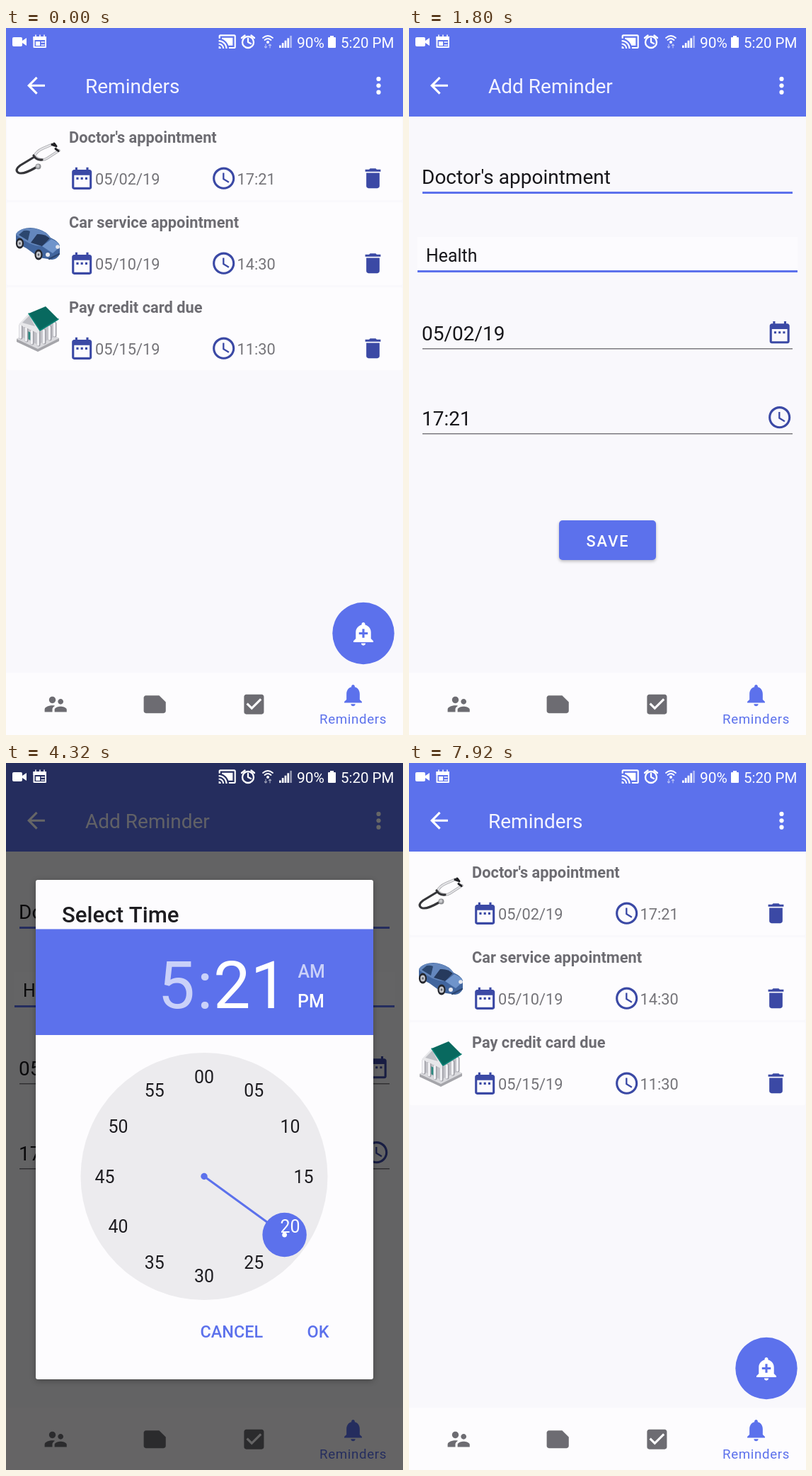
An HTML page with a canvas for the animation above (8000 ms loop, 561 by 998 pixels).

```html
<!DOCTYPE html>
<html lang="en">
<head>
<meta charset="utf-8">
<title>Reminders</title>
<style>
html, body { margin: 0; width: 100%; height: 100%; overflow: hidden; background: #f9f8fc; }
canvas { display: block; width: 561px; height: 998px; }
</style>
</head>
<body>
<canvas id="stage" width="561" height="998"></canvas>
<script>
const W = 561, H = 998, LOOP = 8000, DP = 1.558;
const BLUE = '#5c71ec', INDIGO = '#3b49a5', BG = '#f9f8fc', CARD = '#fdfcfe', GREY = '#6d6c72', INK = '#1d1c20';
const screen = document.getElementById('stage').getContext('2d');
const layerCanvas = Object.assign(document.createElement('canvas'), { width: W, height: H });
const layer = layerCanvas.getContext('2d');
let ctx = screen;

const ICONS = {
  back: 'M20 11H7.83l5.59-5.59L12 4l-8 8 8 8 1.41-1.41L7.83 13H20v-2z',
  calendar: 'M9 11H7v2h2v-2zm4 0h-2v2h2v-2zm4 0h-2v2h2v-2zm2-7h-1V2h-2v2H8V2H6v2H5c-1.11 0-1.99.9-1.99 2L3 20c0 1.1.89 2 2 2h14c1.1 0 2-.9 2-2V6c0-1.1-.9-2-2-2zm0 16H5V9h14v11z',
  clock: 'M11.99 2C6.47 2 2 6.48 2 12s4.47 10 9.99 10C17.52 22 22 17.52 22 12S17.52 2 11.99 2zM12 20c-4.42 0-8-3.58-8-8s3.58-8 8-8 8 3.58 8 8-3.58 8-8 8zm.5-13H11v6l5.25 3.15.75-1.23-4.5-2.67z',
  trash: 'M6 19c0 1.1.9 2 2 2h8c1.1 0 2-.9 2-2V7H6v12zM19 4h-3.5l-1-1h-5l-1 1H5v2h14V4z',
  bell: 'M12 22c1.1 0 2-.9 2-2h-4c0 1.1.89 2 2 2zm6-6v-5c0-3.07-1.64-5.64-4.5-6.32V4c0-.83-.67-1.5-1.5-1.5s-1.5.67-1.5 1.5v.68C7.63 5.36 6 7.92 6 11v5l-2 2v1h16v-1l-2-2z',
  addBell: 'M10.01 21.01c0 1.1.89 1.99 1.99 1.99s1.99-.89 1.99-1.99h-3.98zm8.87-4.19V11c0-3.25-2.25-5.97-5.29-6.69v-.72C13.59 2.71 12.88 2 12 2s-1.59.71-1.59 1.59v.72C7.37 5.03 5.12 7.75 5.12 11v5.82L3 18.94V20h18v-1.06l-2.12-2.12zM16 13.01h-3v3h-2v-3H8V11h3V8h2v3h3v2.01z',
  people: 'M16.5 12c1.38 0 2.49-1.12 2.49-2.5S17.88 7 16.5 7C15.12 7 14 8.12 14 9.5s1.12 2.5 2.5 2.5zM9 11c1.66 0 2.99-1.34 2.99-3S10.66 5 9 5C7.34 5 6 6.34 6 8s1.34 3 3 3zm7.5 3c-1.83 0-5.5.92-5.5 2.75V19h11v-2.25c0-1.83-3.67-2.75-5.5-2.75zM9 13c-2.33 0-7 1.17-7 3.5V19h7v-2.25c0-.85.33-2.34 2.37-3.47C10.5 13.1 9.66 13 9 13z',
  note: 'M22 10l-6-6H4c-1.1 0-2 .9-2 2v12c0 1.1.9 2 2 2h16c1.1 0 2-.9 2-2z',
  check: 'M19 3H5c-1.11 0-2 .9-2 2v14c0 1.1.89 2 2 2h14c1.11 0 2-.9 2-2V5c0-1.1-.89-2-2-2zm-9 14l-5-5 1.41-1.41L10 14.17l7.59-7.59L19 8l-9 9z',
  left: 'M15.41 7.41L14 6l-6 6 6 6 1.41-1.41L10.83 12z',
  right: 'M10 6L8.59 7.41 13.17 12l-4.58 4.59L10 18l6-6z',
  cast: 'M21 3H3c-1.1 0-2 .9-2 2v3h2V5h18v14h-7v2h7c1.1 0 2-.9 2-2V5c0-1.1-.9-2-2-2zM1 18v3h3c0-1.66-1.34-3-3-3zm0-4v2c2.76 0 5 2.24 5 5h2c0-3.87-3.13-7-7-7zm0-4v2c4.97 0 9 4.03 9 9h2c0-6.08-4.93-11-11-11zM19 7H5v1.63c3.96 1.28 7.09 4.41 8.37 8.37H19z'
};
for (const name in ICONS) ICONS[name] = new Path2D(ICONS[name]);

function icon(name, x, y, color, scale = DP) {
  ctx.save();
  ctx.translate(x, y);
  ctx.scale(scale, scale);
  ctx.fillStyle = color;
  ctx.fill(ICONS[name], 'evenodd');
  ctx.restore();
}
function text(str, x, y, size, color, { weight = 400, align = 'left', spacing = 0 } = {}) {
  ctx.font = `${weight} ${size}px Roboto, sans-serif`;
  ctx.textAlign = align;
  ctx.letterSpacing = spacing + 'px';
  ctx.fillStyle = color;
  ctx.fillText(str, x, y);
}
function rect(x, y, w, h, color, radius = 0) {
  ctx.fillStyle = color;
  ctx.beginPath();
  ctx.roundRect(x, y, w, h, radius);
  ctx.fill();
}
function disc(x, y, r, color) {
  ctx.fillStyle = color;
  ctx.beginPath();
  ctx.arc(x, y, r, 0, 7);
  ctx.fill();
}
function shape(d, color) {
  ctx.fillStyle = color;
  ctx.fill(new Path2D(d));
}
function line(d, color, width) {
  ctx.strokeStyle = color;
  ctx.lineWidth = width;
  ctx.lineCap = ctx.lineJoin = 'round';
  ctx.stroke(new Path2D(d));
}
function withAlpha(a, draw) {
  if (a <= 0) return;
  ctx.save();
  ctx.globalAlpha *= a;
  draw();
  ctx.restore();
}
function shadow(blur, y, alpha, draw) {
  ctx.save();
  ctx.shadowColor = `rgba(0,0,0,${alpha})`;
  ctx.shadowBlur = blur;
  ctx.shadowOffsetY = y;
  draw();
  ctx.restore();
}
// Piecewise linear value from [time, value] keys.
function ramp(t, ...keys) {
  if (t <= keys[0][0]) return keys[0][1];
  for (let i = 1; i < keys.length; i++) {
    const [t0, v0] = keys[i - 1], [t1, v1] = keys[i];
    if (t < t1) return v0 + (v1 - v0) * (t - t0) / (t1 - t0);
  }
  return keys[keys.length - 1][1];
}

function statusIcons() {
  const white = '#fff';
  rect(9, 13, 14, 13, white, 2);
  shape('M23 18L29 14V25L23 21Z', white);
  line('M39.5 13V27H56V13', white, 2);
  rect(38.5, 12, 18.5, 5, white);
  rect(42, 19, 6, 6, white);
  line('M50 20H54M50 24H54M42 10V12M48 10V12M54 10V12', white, 1.5);
  icon('cast', 299.5, 6, white, 1.1);
  line('M350 20a8 8 0 1 1-16 0a8 8 0 1 1 16 0M342 15V20L346 22', white, 2.3);
  line('M333 14L337.5 10.5M351 14L346.5 10.5', white, 2.3);
  line('M363 14Q370 8 377 14M365.5 17Q370 13 374.5 17', white, 1.8);
  disc(370, 20, 2, white);
  withAlpha(.55, () => line('M367 23V28M365.5 26.5L367 28L368.5 26.5M373 28V23M371.500 24.500L373 23L374.500 24.500', white, 1.2));
  for (let i = 0; i < 5; i++) withAlpha(i < 4 ? 1 : .5, () => rect(386 + i * 3.8, 24.500 - i * 3.4, 2.700, 3.5 + i * 3.4, white));
  text('90%', 411, 27.5, 21, white);
  rect(455, 13, 11, 15, white, 1);
  rect(458, 11, 5, 3, white);
  text('5:20 PM', 473, 27.5, 20.5, white);
}

function chrome(title) {
  rect(0, 0, W, H, BG);
  rect(0, 0, W, 125, BLUE);
  icon('back', 23.8, 62.5, '#fff');
  text(title, 112, 92, 28, '#f4f4ff');
  for (const dy of [-9.4, 0, 9.4]) disc(526.5, 81.3 + dy, 3.1, '#fff');
  rect(0, 910, W, 88, CARD);
  icon('people', 51.5, 936, GREY);
  icon('note', 191.5, 936, GREY);
  icon('check', 331.7, 936, GREY);
  icon('bell', 471.8, 923, BLUE);
  text('Reminders', 490.5, 982, 18.7, BLUE, { align: 'center', spacing: .65 });
}

function stethoscope() {
  line('M40 181Q43 174 52 170L66 164M40 181Q50 189 58 184L75 173', '#a9a9ad', 3.6);
  line('M40 181Q43 174 52 170L66 164M40 181Q50 189 58 184L75 173', '#e6e6e9', 2);
  line('M39 180Q43 187 51 186M40 182L20 194Q12 200 17 204Q23 208 42 197', '#353539', 3.2);
  line('M65 164.500L69 166M70 170.500L74 173.500M68 163L71 167', '#202024', 3);
  disc(45.5, 195.5, 4, '#8f9094');
  disc(45, 195, 2.4, '#c9cacd');
}
function car() {
  shape('M14 292Q15 287 23 284Q34 280 46 284Q57 287 63 296Q74 301 76 307L76 319Q73 326 65 327L47 324L29 311L14 303Z', '#41659e');
  shape('M14 292Q15 287 23 284Q39 281 48 285Q60 290 63 297L49 308Q33 307 14 292Z', '#6487bd');
  shape('M35 303L44 291Q55 290 62 297L51 308Z', '#263a5d');
  shape('M18 292L25 286Q30 285 34 287L31 300Z', '#2c476f');
  shape('M51 308L64 298Q75 302 76 309L66 318Z', '#6f94cb');
  for (const [x, y] of [[19.5, 304], [46, 320]]) {
    ctx.save();
    ctx.translate(x, y);
    ctx.scale(.75, 1);
    disc(0, 0, 7.5, '#24262d');
    disc(0, 0, 4.5, '#c6c8cf');
    disc(0, 0, 1.8, '#60646d');
    ctx.restore();
  }
  disc(59, 320, 3, '#e8eaf0');
  disc(73, 309, 2.8, '#e8eaf0');
  line('M61 326L75 319', '#2b456f', 2);
}
function bank() {
  shape('M15 439L45 424L75 438V442L45 457L15 443Z', '#a5a5aa');
  shape('M15 439L45 424L75 438L45 453Z', '#dadade');
  shape('M22 421L47 426L70 414V435L45 447L22 436Z', '#c2c2c8');
  shape('M29 427L39 432V443L29 438Z', '#2b8980');
  for (const [x, y] of [[21, 420], [29, 424], [37, 428], [46, 430], [54, 427], [62, 422], [69, 417]]) {
    line(`M${x} ${y}V${y + 17}`, '#9f9fa6', 5);
    line(`M${x - .7} ${y}V${y + 17}`, '#f1f1f4', 3.3);
  }
  shape('M18 418L33 402L47 427V432Z', '#e7e7ea');
  shape('M23 416L33 406L41 421Z', '#bdbec4');
  shape('M32 403L56 393L74 411L48 427Z', '#08695f');
  line('M32 403L48 427L74 411', '#0b8376', 1.5);
}

function listScreen() {
  chrome('Reminders');
  const rows = [
    ["Doctor's appointment", '05/02/19', '17:21'],
    ['Car service appointment', '05/10/19', '14:30'],
    ['Pay credit card due', '05/15/19', '11:30']
  ];
  rows.forEach(([title, date, time], i) => {
    const y = i * 120;
    rect(1, 126 + y, 559, 117, CARD, 2);
    text(title, 89, 162 + y, 21.8, GREY, { weight: 700 });
    icon('calendar', 88.5, 193.7 + y, INDIGO);
    text(date, 126, 221 + y, 21.8, '#757479');
    icon('clock', 289, 193.5 + y, INDIGO);
    text(time, 326.5, 221 + y, 21.8, '#757479');
    icon('trash', 499.8, 193.5 + y, INDIGO);
  });
  stethoscope();
  car();
  bank();
  disc(505, 854.5, 43.7, BLUE);
  icon('addBell', 486.3, 835.8, '#fff');
}

function formScreen(t) {
  chrome('Add Reminder');
  text("Doctor's appointment", 18, 220, 28, '#17161a');
  if (t < 1800) rect(293.5, 191, 2.5, 37, BLUE);
  rect(19, 231, 523, 3, BLUE);
  rect(12, 295, 537, 47, '#fcfbfe');
  text('Health', 24, 330, 24.9, '#17161a');
  rect(12, 342, 537, 3, BLUE);
  text('05/02/19', 18, 441, 28, '#17161a');
  text('17:21', 18, 561, 28, '#17161a');
  rect(19, 452, 523, 1.5, '#7c7b80');
  rect(19, 572, 523, 1.5, '#7c7b80');
  icon('calendar', 505, 411, INDIGO);
  icon('clock', 505, 531, INDIGO);
  shadow(4, 2, .25, () => rect(212, 695, 137, 56, BLUE, 5));
  text('SAVE', 281, 732, 21.8, '#fff', { weight: 500, align: 'center', spacing: 1.95 });
}

function buttons(y) {
  text('CANCEL', 274.5, y, 23.4, BLUE, { weight: 500 });
  text('OK', 425.5, y, 23.4, BLUE, { weight: 500 });
}

function dateDialog(t) {
  shadow(8, 2, .3, () => rect(42, 125, 477, 785, CARD, 3));
  rect(42, 125, 477, 145.5, BLUE, [3, 3, 0, 0]);
  text('2019', 79.500, 174, 24.9, 'rgba(255,255,255,.7)', { weight: 500 });
  text('Thu, May 2', 79, 230, 53, '#fff', { weight: 500 });
  withAlpha(ramp(t, [1080, 0], [1140, .32], [1270, 1]), () => {
    icon('left', 83.7, 304.6, INK);
    icon('right', 439.5, 304.6, INK);
    text('May 2019', 280.5, 331, 21.8, INK, { weight: 500, align: 'center' });
    const column = i => 102.5 + i * 59.2;
    [...'SMTWTFS'].forEach((d, i) => text(d, column(i), 402, 18.7, '#7b7a80', { align: 'center' }));
    disc(339.3, 454.5, 31.2, BLUE);
    for (let day = 1; day <= 31; day++) {
      const cell = day + 2;
      text(day, column(cell % 7), 461 + Math.floor(cell / 7) * 62.3, 18.7, day === 2 ? '#fff' : INK, { align: 'center' });
    }
  });
  buttons(850);
}

function dial(label, selected, dotted) {
  const cx = 280, cy = 583.5, R = 140.4;
  const at = (angle, r) => [cx + r * Math.sin(angle), cy - r * Math.cos(angle)];
  const numbers = color => {
    for (let i = 0; i < 12; i++) {
      const [x, y] = at(i * Math.PI / 6, R);
      text(label(i), x, y + 9, 24.9, color, { align: 'center' });
    }
  };
  numbers(INK);
  const [ex, ey] = at(selected, R - 31), [x, y] = at(selected, R);
  line(`M${cx} ${cy}L${ex} ${ey}`, BLUE, 3);
  disc(cx, cy, 4.7, BLUE);
  disc(x, y, 31.2, BLUE);
  ctx.save();
  ctx.clip(new Path2D(`M${x - 31} ${y}a31 31 0 1 1 62 0a31 31 0 1 1 -62 0`));
  numbers('#fff');
  ctx.restore();
  if (dotted) disc(x, y, 3.4, '#fff');
}

function timeDialog(t) {
  const minute = t < 3900 ? 20 : 21;
  const minutes = ramp(t, [3060, 0], [3300, 1]);
  const onMinutes = t >= 3060;
  const tone = on => on ? '#fff' : 'rgba(255,255,255,.68)';
  shadow(8, 2, .3, () => rect(42, 165, 477, 705, CARD, 3));
  text('Select Time', 79, 225, 31.2, INK, { weight: 500 });
  rect(42, 234.5, 477, 149.5, BLUE);
  text('5', 214.5, 346, 93.5, tone(!onMinutes));
  text(':', 281, 346, 93.5, tone(false), { align: 'center' });
  text(minute, 293, 346, 93.5, tone(onMinutes));
  text('AM', 412.5, 303, 24.9, tone(false), { weight: 500 });
  text('PM', 412, 345, 24.9, '#fff', { weight: 500 });
  disc(280, 583.5, 174.5, '#ecebee');
  withAlpha(1 - minutes, () => dial(i => i || 12, 5 * Math.PI / 6, false));
  withAlpha(minutes, () => dial(i => String(i * 5).padStart(2, '0'), minute * Math.PI / 30, minute % 5 > 0));
  buttons(811);
}

function popup(draw, t, dim, alpha) {
  screen.fillStyle = `rgba(0,0,0,${dim})`;
  screen.fillRect(0, 0, W, H);
  if (alpha <= 0) return;
  layer.clearRect(0, 0, W, H);
  ctx = layer;
  draw(t);
  ctx = screen;
  withAlpha(alpha, () => screen.drawImage(layerCanvas, 0, 0));
}

function render(t) {
  if (t < 480 || t >= 5340) listScreen();
  else formScreen(t);
  if (t > 1020 && t < 1800) {
    popup(dateDialog, t,
      ramp(t, [1020, 0], [1140, .39], [1210, .6], [1620, .6], [1680, .45], [1800, 0]),
      ramp(t, [1020, 0], [1140, .97], [1160, 1], [1620, 1], [1680, .46], [1740, 0]));
  } else if (t > 2100 && t < 4920) {
    popup(timeDialog, t,
      ramp(t, [2100, 0], [2160, .13], [2320, .6], [4740, .6], [4800, .45], [4920, 0]),
      ramp(t, [2100, 0], [2160, .58], [2220, 1], [4740, 1], [4800, .46], [4860, 0]));
  }
  statusIcons();
}

const start = performance.now();
function tick() {
  render((performance.now() - start) % LOOP);
  requestAnimationFrame(tick);
}
tick();
</script>
</body>
</html>
```
